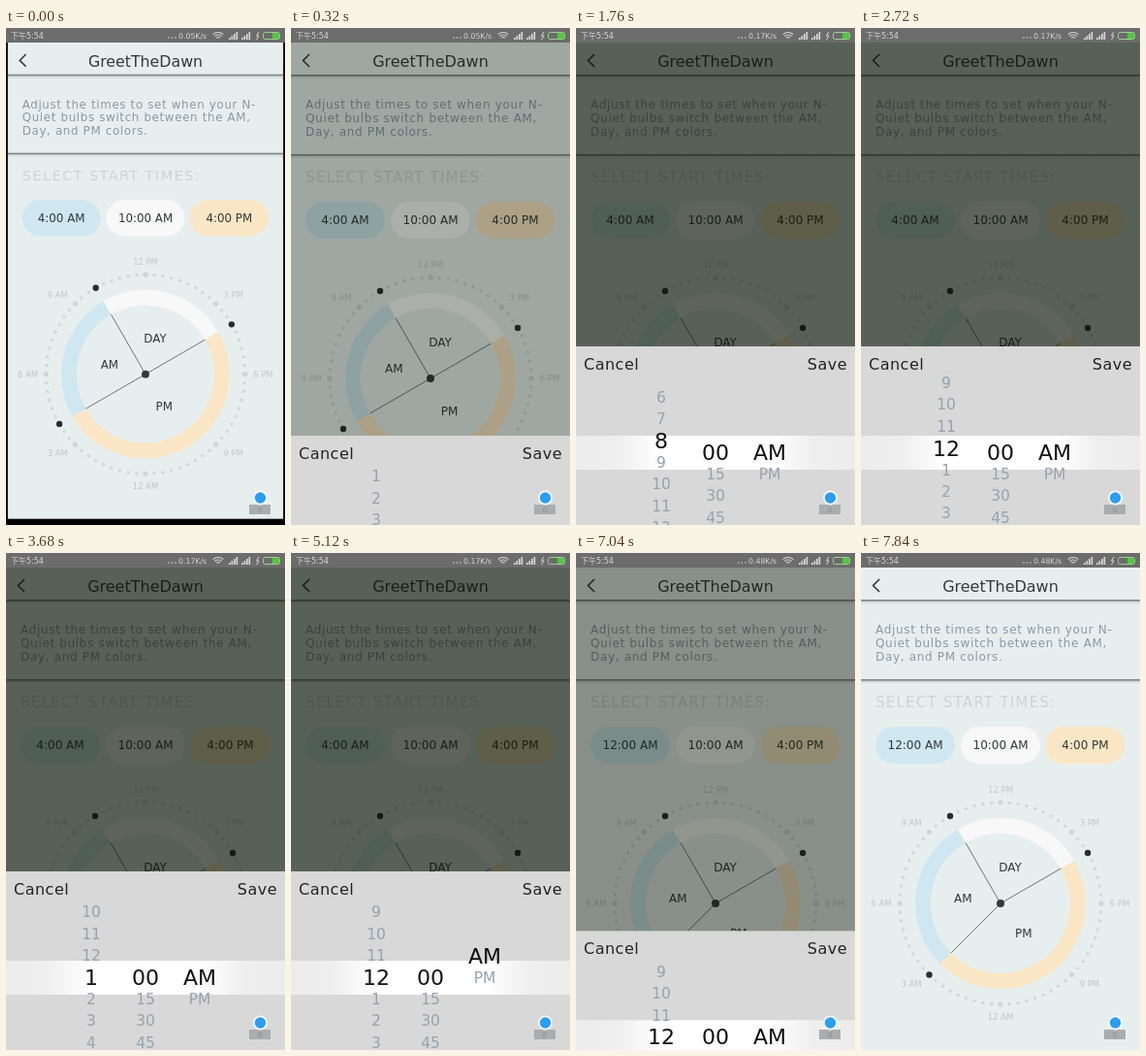
Write an HTML page with a canvas that moves like this. It is 288 px wide and 512 px high and loops after 8 s.

```html
<!DOCTYPE html>
<html lang="en">
<head>
<meta charset="utf-8">
<title>Light schedule</title>
<style>
  html, body { margin: 0; width: 100%; height: 100%; overflow: hidden; background: #000; }
  canvas { display: block; width: 288px; height: 512px; }
</style>
</head>
<body>
<canvas id="stage"></canvas>
<script>
const W = 288, H = 512, LOOP = 8000, STEP = 160;
const BLUE = '#cfe7f0', WHITE = '#f8f8f8', SAND = '#fae6c5', INK = '#333938';
const DIAL = { x: 144, y: 361, ring: 80, dots: 104 };
const PICKER = { top: 328, mid: 437, row: 22.4 };

const canvas = document.getElementById('stage');
const ctx = canvas.getContext('2d');
const ratio = window.devicePixelRatio || 1;
canvas.width = W * ratio;
canvas.height = H * ratio;

// Linear interpolation through [time, value] keys.
function track(keys, t) {
  if (t <= keys[0][0]) return keys[0][1];
  for (let i = 1; i < keys.length; i++) {
    const [t0, v0] = keys[i - 1], [t1, v1] = keys[i];
    if (t <= t1) return v0 + (v1 - v0) * (t - t0) / (t1 - t0);
  }
  return keys[keys.length - 1][1];
}

const sheetKeys = [[160, 0], [480, 1], [6880, 1], [7360, 0]];
const hourKeys = [[1280, 4], [1760, 8.55], [2240, 11], [3040, 13], [3680, 13], [4320, 12]];
const halfKeys = [[4640, 0], [5120, .97], [5600, 0], [5760, 0], [6240, -.4], [6720, 0]];

function text(str, x, y, size, color, align = 'center', spacing = 0) {
  ctx.font = `${size}px "DejaVu Sans", "Noto Sans CJK SC", sans-serif`;
  ctx.letterSpacing = spacing + 'px';
  ctx.textAlign = align;
  ctx.textBaseline = 'alphabetic';
  ctx.fillStyle = color;
  ctx.fillText(str, x, y + size * .365);
}

function rect(x, y, w, h, color) {
  ctx.fillStyle = color;
  ctx.fillRect(x, y, w, h);
}

function circle(x, y, r, color) {
  ctx.fillStyle = color;
  ctx.beginPath();
  ctx.arc(x, y, r, 0, Math.PI * 2);
  ctx.fill();
}

function stroke(points, color, width) {
  ctx.strokeStyle = color;
  ctx.lineWidth = width;
  ctx.beginPath();
  points.forEach(([x, y]) => ctx.lineTo(x, y));
  ctx.stroke();
}

function pill(x, label, color) {
  ctx.fillStyle = color;
  ctx.beginPath();
  ctx.roundRect(x, 179, 82, 38, 19);
  ctx.fill();
  text(label, x + 41, 198, 12, INK);
}

function divider(y) {
  const shade = ctx.createLinearGradient(0, y, 0, y + 4);
  shade.addColorStop(0, 'rgba(70,85,80,.2)');
  shade.addColorStop(1, 'rgba(70,85,80,0)');
  rect(0, y, W, 4, shade);
  rect(0, y - 1, W, 1.6, '#7d8884');
}

// Noon is at the top, one full turn is 24 hours.
const hourAngle = hour => (hour - 12) / 12 * Math.PI - Math.PI / 2;
function onDial(hour, r) {
  const a = hourAngle(hour);
  return [DIAL.x + r * Math.cos(a), DIAL.y + r * Math.sin(a)];
}

function drawDial(morning) {
  for (let i = 0; i < 72; i++) {
    circle(...onDial(i / 3, DIAL.dots), i % 9 ? 1.7 : 2.7, '#d0d7d5');
  }
  for (let hour = 0; hour < 24; hour += 3) {
    const a = hourAngle(hour);
    text(`${hour % 12 || 12} ${hour < 12 ? 'AM' : 'PM'}`,
      DIAL.x + Math.cos(a) * (hour % 12 === 6 ? 123 : 130),
      DIAL.y + Math.sin(a) * 117, 8.5, '#c0c8c5');
  }
  const sectors = [['AM', morning, 10, BLUE], ['DAY', 10, 16, WHITE], ['PM', 16, 24 + morning, SAND]];
  for (const [label, from, to, color] of sectors) {
    ctx.strokeStyle = color;
    ctx.lineWidth = 16;
    ctx.beginPath();
    ctx.arc(DIAL.x, DIAL.y, DIAL.ring, hourAngle(from), hourAngle(to));
    ctx.stroke();
    text(label, ...onDial((from + to) / 2, 39), 12, INK);
  }
  for (const [, from] of sectors) {
    stroke([[DIAL.x, DIAL.y], onDial(from, 72)], '#6d7472', 1);
    circle(...onDial(from, DIAL.dots), 3.2, '#292d2c');
  }
  circle(DIAL.x, DIAL.y, 4, '#353a39');
}

function drawPage(saved) {
  rect(0, 0, W, H, '#e7efee');
  divider(49);
  divider(131);
  stroke([[19, 27], [12.5, 33.5], [19, 40]], INK, 1.6);
  text('GreetTheDawn', 144, 34, 16, INK);
  ['Adjust the times to set when your N-',
   'Quiet bulbs switch between the AM,',
   'Day, and PM colors.'
  ].forEach((line, i) => text(line, 15, 79 + i * 14, 12, '#8c97aa', 'left', .67));
  text('SELECT START TIMES:', 15, 153.5, 15, '#cdd4d2', 'left', 1.25);
  pill(15, saved ? '12:00 AM' : '4:00 AM', BLUE);
  pill(103, '10:00 AM', WHITE);
  pill(190.5, '4:00 PM', SAND);
  drawDial(saved ? 3 : 4);
}

function drawStatusBar(t) {
  const light = '#d6d6d6';
  const speed = t < 1280 ? '0.05' : t < 6880 ? '0.17' : '0.48';
  rect(0, 0, W, 15, '#6b6c6b');
  text('下午5:54', 5, 8, 8, light, 'left');
  [168, 171.5, 175].forEach(x => circle(x, 10, .8, light));
  text(speed + 'K/s', 178, 8, 7.8, light, 'left');
  ctx.strokeStyle = light;
  ctx.lineWidth = 1.2;
  for (const r of [2.5, 5, 7.5]) {
    ctx.beginPath();
    ctx.arc(219, 12, r, -Math.PI * .75, -Math.PI * .25);
    ctx.stroke();
  }
  for (const x of [230, 243]) {
    for (let i = 0; i < 4; i++) rect(x + i * 2.5, 10 - i * 2, 1.7, 2 + i * 2, light);
  }
  stroke([[261, 4], [258.5, 8], [261, 8], [258.5, 12]], light, 1);
  ctx.strokeStyle = '#9ccf92';
  ctx.beginPath();
  ctx.roundRect(265.5, 4.5, 17, 7, 2);
  ctx.stroke();
  rect(275, 5, 7, 6, '#54c443');
}

function wheel(x, position, labelAt, count = Infinity) {
  const nearest = Math.round(position);
  const selected = Math.max(0, Math.floor(position));
  for (let i = nearest - 3; i <= nearest + 3; i++) {
    if (i < 0 || i >= count) continue;
    const y = PICKER.mid + (i - position) * PICKER.row;
    const active = i === selected;
    text(labelAt(i), x, y, active ? 22 : 15.5, active ? '#111' : '#94a3b0');
  }
}

function drawSheet(t) {
  rect(0, PICKER.top, W, H - PICKER.top, '#d8d8d8');
  const band = ctx.createLinearGradient(0, 0, W, 0);
  [[0, '#ececec'], [.15, '#efefef'], [.3, '#fff'], [.7, '#fff'], [.85, '#efefef'], [1, '#ececec']]
    .forEach(stop => band.addColorStop(...stop));
  rect(0, 420, W, 35, band);
  text('Cancel', 8, 346, 16, '#222', 'left', .5);
  text('Save', 280, 346, 16, '#222', 'right', .5);
  wheel(88, track(hourKeys, t), i => String((i + 11) % 12 + 1));
  wheel(144, 0, i => ['00', '15', '30', '45'][i], 4);
  wheel(200, track(halfKeys, t), i => ['AM', 'PM'][i], 2);
}

function drawBubble() {
  rect(251, 491, 22, 10, '#a9adad');
  text('0', 262, 496, 7, '#858989');
  circle(262.5, 484, 7.5, '#f4f9fc');
  circle(262.5, 484, 5.7, '#2b9df2');
}

function draw(t) {
  const open = track(sheetKeys, t);
  ctx.setTransform(ratio, 0, 0, ratio, 0, 0);
  rect(0, 0, W, H, '#000');

  ctx.save();
  if (t < STEP) {
    ctx.translate(144, 25);
    ctx.scale(.987, .987);
    ctx.translate(-144, -25);
  }
  drawPage(t >= 7040);
  ctx.restore();

  if (open > 0) {
    rect(0, 0, W, H, `rgba(8,18,2,${.64 * open})`);
    ctx.save();
    ctx.translate(0, (1 - open) * (H - PICKER.top));
    drawSheet(t);
    ctx.restore();
  }
  drawStatusBar(t);
  drawBubble();
}

const start = performance.now();
function frame() {
  const elapsed = (performance.now() - start) % LOOP;
  draw(Math.floor(elapsed / STEP) * STEP);
  requestAnimationFrame(frame);
}
frame();
</script>
</body>
</html>
```
